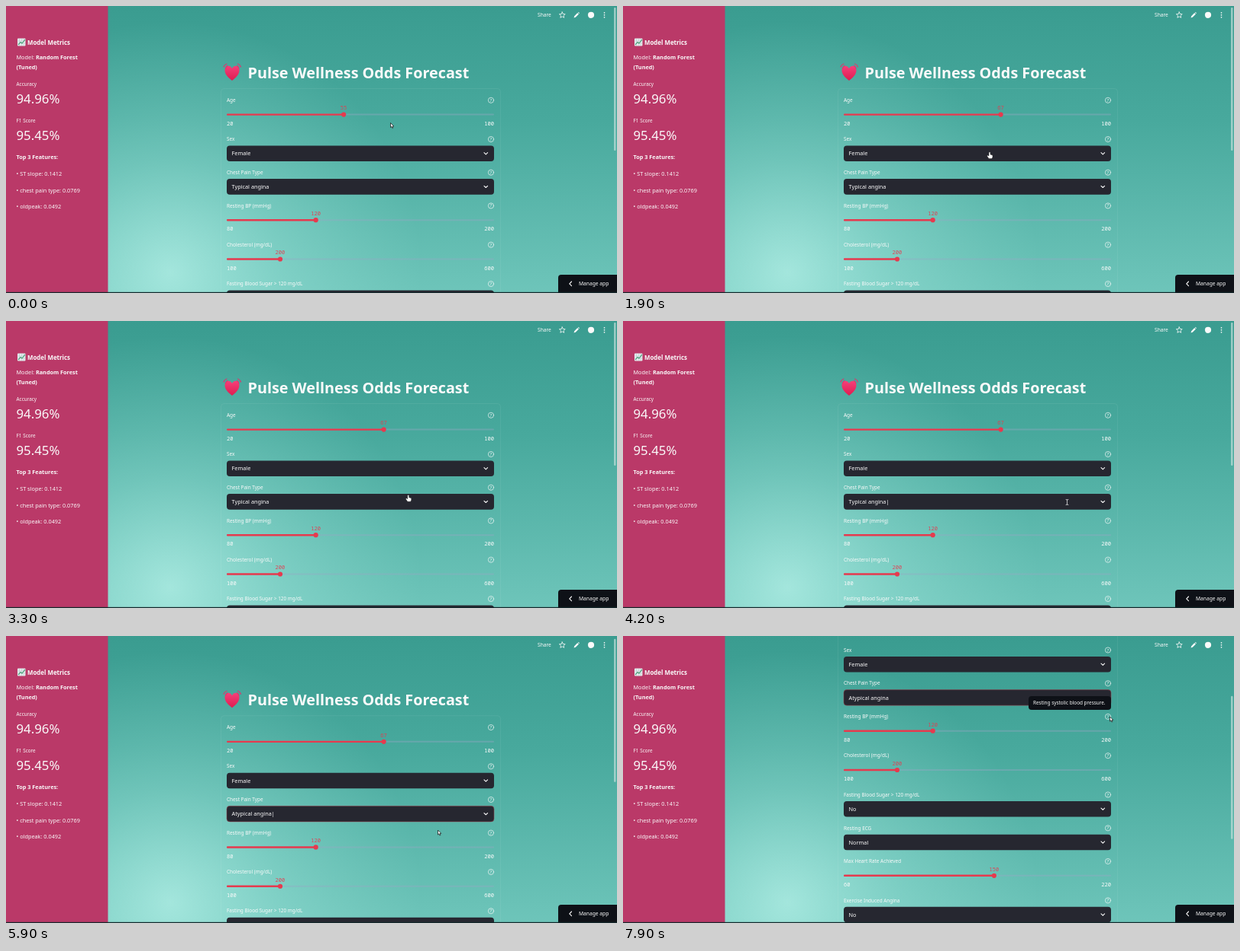
These frames come from a looping animation (800 by 377 pixels, 8000 ms). An HTML page:

```html
<!DOCTYPE html>
<html lang="en">
<head>
<meta charset="utf-8">
<title>Risk form</title>
<style>
html, body { margin: 0; width: 100%; height: 100%; overflow: hidden; background: #3c9f93; }
svg { display: block; width: 800px; height: 377px; font-family: "Noto Sans", "Open Sans", sans-serif; fill: #fafafa; }
.label { font-size: 6.4px; }
.body { font-size: 7.3px; }
.bold { font-weight: 700; }
.big { font-size: 16.8px; }
.title { font-size: 19.8px; font-weight: 700; }
.mono { font: 7.1px "Noto Sans Mono", "DejaVu Sans Mono", monospace; }
.end { text-anchor: end; }
.mid { text-anchor: middle; }
.line { fill: none; stroke: #fafafa; stroke-linecap: round; stroke-linejoin: round; }
</style>
</head>
<body>
<svg viewBox="0 0 800 377">
  <defs>
    <linearGradient id="sea" x2="0" y2="1">
      <stop offset="0" stop-color="#3a9c90"/>
      <stop offset=".4" stop-color="#48a99d"/>
      <stop offset="1" stop-color="#6ec5ba"/>
    </linearGradient>
    <radialGradient id="glow" gradientUnits="userSpaceOnUse" cx="215" cy="350" r="330">
      <stop offset="0" stop-color="#b2efe6" stop-opacity=".8"/>
      <stop offset=".45" stop-color="#a0e6dc" stop-opacity=".38"/>
      <stop offset="1" stop-color="#90dbd0" stop-opacity="0"/>
    </radialGradient>
    <linearGradient id="pink" x2="0" y2="1">
      <stop offset="0" stop-color="#f5407a"/>
      <stop offset="1" stop-color="#df1c50"/>
    </linearGradient>
  </defs>
  <rect width="800" height="377" fill="url(#sea)"/>
  <rect width="800" height="377" fill="url(#glow)"/>
  <g id="page"></g>
  <g id="frame"></g>
  <g id="pointer"></g>
</svg>
<script>
const LOOP = 8000, TICK = 100;
const LEFT = 289, RIGHT = 639, WIDTH = RIGHT - LEFT;
const RED = '#e63a4e', DARK = '#262730', BLACK = '#0e1117';
const $ = id => document.getElementById(id);

const text = (x, y, str, cls, extra = '') => `<text x="${x}" y="${y}" class="${cls}" ${extra}>${str}</text>`;
const rect = (x, y, w, h, fill, rx = 0, extra = '') =>
  `<rect x="${x}" y="${y}" width="${w}" height="${h}" rx="${rx}" fill="${fill}" ${extra}/>`;
const circle = (x, y, r, extra = '') => `<circle cx="${x}" cy="${y}" r="${r}" ${extra}/>`;
const path = (d, extra = 'class="line"') => `<path d="${d}" ${extra}/>`;

const clamp = v => Math.min(1, Math.max(0, v));
const between = (t, a, b) => t >= a && t < b;
const progress = (t, a, b) => clamp((t - a) / (b - a));
const smooth = p => p * p * (3 - 2 * p);
const cubic = p => p < .5 ? 4 * p ** 3 : 1 - 4 * (1 - p) ** 3;

// Pointer stops: time, x, y
const stops = [
  [0, 503.5, 153.5], [400, 442, 141], [500, 442, 141], [900, 492, 136], [1200, 492, 136],
  [1800, 480, 192], [2100, 480, 192], [2500, 472, 219.5], [3000, 472, 219.5],
  [3600, 581.5, 238], [4400, 581.5, 238], [5000, 560, 278], [5400, 560, 278],
  [5800, 565.5, 255], [5900, 565.5, 255], [6400, 570, 134], [6600, 570, 134],
  [7200, 637.5, 106], [LOOP, 637.5, 106]
];

function pointerAt(t) {
  const i = stops.findIndex(s => s[0] > t);
  const [t0, x0, y0] = stops[i - 1], [t1, x1, y1] = stops[i];
  const p = smooth(progress(t, t0, t1));
  return { x: x0 + (x1 - x0) * p, y: y0 + (y1 - y0) * p };
}

function pointer(t) {
  const { x, y } = pointerAt(t);
  let shape;
  if (between(t, 3400, 4500)) {
    shape = path('M-1.4-3.5Q0-3.5 0-2.8Q0-3.5 1.4-3.5M0-3V3M-1.4 3.5Q0 3.5 0 2.8Q0 3.5 1.4 3.5', 'class="line" stroke-width=".7"');
  } else if (between(t, 400, 3400) || between(t, 4500, 5500)) {
    shape = path('M-1 .3Q0-1 1 .3V3L4 4V6.5L3 8.5H-1L-3.4 5L-2.4 4L-1 5Z', 'fill="#fff" stroke="#222" stroke-width=".5"');
  } else {
    shape = path('M0 0V6L1.4 4.8L2.4 7L3.4 6.5L2.4 4.4H4.3Z', 'fill="#fff" stroke="#111" stroke-width=".7"');
  }
  return `<g transform="translate(${x} ${y})">${shape}</g>`;
}

const heading = (y, str) => text(LEFT, y + 2.2, str, 'label') +
  circle(635, y, 3.6, 'class="line" stroke-width=".65"') +
  text(635, y + 2, '?', 'mid', 'font-size="5.6"');

function slider(y, name, min, max, value) {
  const x = LEFT + WIDTH * (value - min) / (max - min), bar = y + 18.8;
  return heading(y, name) +
    rect(LEFT, bar - 1, WIDTH, 2, '#97a6c3', 1, 'opacity=".4"') +
    rect(LEFT, bar - 1.2, x - LEFT, 2.4, RED, 1) + circle(x, bar, 3.1, `fill="${RED}"`) +
    text(x, y + 12.6, value, 'mono mid', `fill="${RED}" opacity=".9"`) +
    text(LEFT, y + 33, min, 'mono') + text(RIGHT, y + 33, max, 'mono end');
}

function select(y, name, value, { focus, caret } = {}) {
  const top = y + 8.4;
  return heading(y, name) +
    rect(LEFT, top, WIDTH, 20.6, DARK, 4, focus ? 'stroke="#a04450" stroke-width=".5"' : '') +
    text(295.5, top + 13, value + (caret ? '<tspan font-weight="300">|</tspan>' : ''), 'body') +
    path(`M626 ${top + 9.2}L628.3 ${top + 11.4}L630.6 ${top + 9.2}`, 'class="line" stroke-width="1.1"');
}

const menu = (top, items, active) =>
  rect(LEFT, top, WIDTH, items.length * 21 + 1, BLACK, 4) +
  items.map((item, i) => (i === active ? rect(LEFT, top + .5 + i * 21, WIDTH, 21, DARK, 3) : '') +
    text(297, top + 13.2 + i * 21, item, 'body')).join('');

const heart = path('M296 98C291 94 286.500 90 286.500 84.500C286.500 78 293.500 76.500 296 82C298.500 76.500 305.500 78 305.500 84.500C305.500 90 301 94 296 98Z', 'fill="url(#pink)"') +
  path('M285 80Q286 77 289 76M287.500 82Q288 79.500 290 78.500M307.500 80Q306.500 77 303.500 76M305 82Q304.500 79.500 302.500 78.500',
    'fill="none" stroke="#e0346c" stroke-width="1.2" stroke-linecap="round"');

function page(t, scroll) {
  const age = Math.round(55 + 12 * smooth(progress(t, 500, 900)));
  const sexOpen = between(t, 2000, 3100), painOpen = between(t, 4400, 5400);
  const picked = t >= 5400;
  const caret = between(t, 4000, 4400) || between(t, 5500, 6000);
  const row = top => Math.max(0, Math.floor((pointerAt(t).y - top) / 21));
  return `<g transform="translate(0 ${-scroll})">` +
    heart + text(316.5, 94.5, 'Pulse Wellness Odds Forecast', 'title') +
    rect(281.5, 108.5, 366, 700, 'none', 4, 'stroke="#fff" stroke-opacity=".13" stroke-width=".5"') +
    slider(123.8, 'Age', 20, 100, age) +
    select(175, 'Sex', 'Female', { focus: sexOpen }) +
    select(218.7, 'Chest Pain Type', picked ? 'Atypical angina' : 'Typical angina', { focus: painOpen || picked, caret }) +
    slider(262.4, 'Resting BP (mmHg)', 80, 200, 120) +
    slider(313.7, 'Cholesterol (mg/dL)', 100, 600, 200) +
    select(365, 'Fasting Blood Sugar &gt; 120 mg/dL', 'No') +
    select(408.8, 'Resting ECG', 'Normal') +
    slider(452.5, 'Max Heart Rate Achieved', 60, 220, 150) +
    select(503.8, 'Exercise Induced Angina', 'No') +
    (sexOpen ? menu(204.4, ['Female', 'Male'], row(204.4)) : '') +
    (painOpen ? menu(248.2, ['Typical angina', 'Atypical angina', 'Non-anginal pain', 'Asymptomatic'], row(248.2)) : '') +
    '</g>' +
    (t >= 7400 ? rect(531, 79, 108, 18, BLACK, 4) + text(537, 90.2, 'Resting systolic blood pressure.', 'label') : '');
}

const sidebar = rect(0, 0, 133.5, 377, '#ba3968') +
  rect(15, 42.5, 10.5, 10, '#e4ebec', 1) +
  path('M17.500 43V52M20.500 43V52M23 43V52M15.500 46H25M15.500 49H25', 'stroke="#a9bfc4" stroke-width=".4"') +
  path('M16 51L19 47.500L21 49L25 44', 'fill="none" stroke="#3f9a70" stroke-width="1.1"') +
  text(28, 50.6, 'Model Metrics', 'bold', 'font-size="7.900"') +
  text(13.5, 70.4, 'Model: <tspan class="bold">Random Forest</tspan>', 'body') +
  text(13.5, 83.2, '(Tuned)', 'body bold') +
  text(13.5, 104.8, 'Accuracy', 'label') + text(13.5, 128, '94.96%', 'big') +
  text(13.5, 152.8, 'F1 Score', 'label') + text(13.5, 176, '95.45%', 'big') +
  text(13.5, 201.2, 'Top 3 Features:', 'body bold') +
  ['ST slope: 0.1412', 'chest pain type: 0.0769', 'oldpeak: 0.0492']
    .map((item, i) => text(13.5, 223 + i * 21.7, '• ' + item, 'body')).join('');

const star = Array.from({ length: 10 }, (_, i) => {
  const a = i * Math.PI / 5, r = i % 2 ? 1.9 : 4.1;
  return `${728.3 + r * Math.sin(a)} ${12 - r * Math.cos(a)}`;
}).join('L');

const toolbar = text(696, 14.2, 'Share', '', 'font-size="6.650"') +
  path(`M${star}Z`, 'class="line" stroke-width=".8"') +
  path('M743.500 15.500L744.200 13.200L748.300 9.100L749.900 10.700L745.800 14.800ZM748.900 8.500L749.700 7.900L751 9.200L750.400 10Z', 'fill="#fafafa"') +
  circle(766, 11.8, 4.1) +
  [8.8, 11.8, 14.8].map(y => circle(783.5, y, .85)).join('') +
  path('M723 377V357Q723 353 727 353H800V377Z', `fill="${BLACK}"`) +
  path('M740.500 362L737.800 364.800L740.500 367.600', 'class="line" stroke-width="1.1"') +
  text(750, 367.2, 'Manage app', '', 'font-size="6.700"') +
  rect(0, 375.8, 800, 1.2, '#14282c');

function render(t) {
  const scroll = 156.5 * cubic(progress(t, 5800, 6350));
  $('page').innerHTML = page(t, scroll);
  $('frame').innerHTML = sidebar + toolbar + rect(796, 2 + scroll * .49, 2.5, 188, '#c4e0dc', 1.2, 'opacity=".7"');
  $('pointer').innerHTML = pointer(t);
}

const start = performance.now();
let shown = -1;
function step() {
  const t = Math.floor((performance.now() - start) % LOOP / TICK) * TICK;
  if (t !== shown) render(shown = t);
  requestAnimationFrame(step);
}
step();
</script>
</body>
</html>
```
